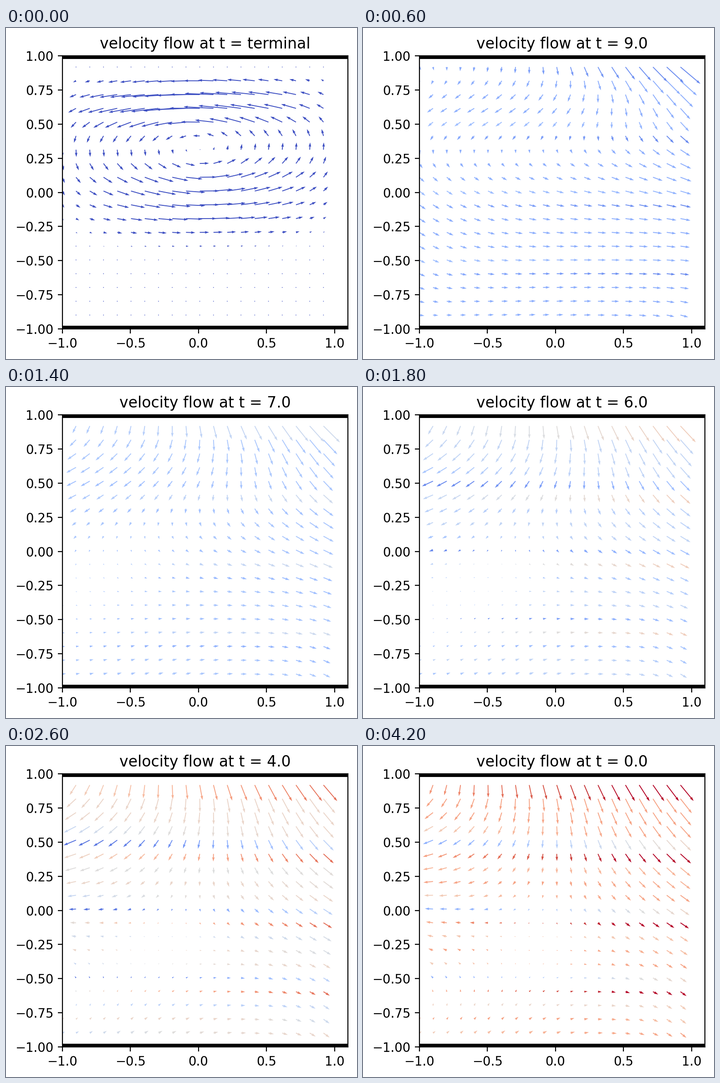
Recreate the animation shown at these times as a matplotlib script. Size 771 by 726 pixels, loop 4.4 s.

```python
import numpy as np
import matplotlib.pyplot as plt
from matplotlib.animation import FuncAnimation

W, H, DPI = 771, 726, 200
LEFT, TOP, BOTTOM, AX_W = 123.6, 61.4, 659.8, 627.8   # axes box in pixels
STEP_MS, FRAMES = 200, 22
N = 20

grid = -1 + np.arange(N) * 10 / 99
x, y = np.meshgrid(grid, grid)
band, place = np.divmod(np.arange(N * N), 100)
strip = place / 99


def bell(z, centre, width, power=2):
    return np.exp(-np.abs((z - centre) / width) ** power)


def sigmoid(z):
    return 1 / (1 + np.exp(-z))


# All fields give arrow components in pixels, v pointing up.
def vortex():
    """A flat vortex under the lid, calm near both walls."""
    lid = np.clip((0.93 - y) / 0.12, 0, 1)
    along = 43 * bell(y, -0.04, 0.28, 3) - 70 * bell(y, 0.66, 0.2) * lid
    narrow = np.cos(1.4 * x) ** (1 + 1.6 * (y - 0.31) ** 2)
    across = 16 * bell(y, 0.31, 0.42) * lid
    return along * narrow, across * np.tanh(3.5 * x)


def spreading():
    """Flow at t = 0: falls from the top and fans out sideways."""
    u = 5.5 * (y - 0.4) ** 2 + 9 * np.exp(8 * (y - 0.92)) + 25 * bell(y, 0.45, 1) * x
    down = 5.3 + 20 * y + 11 * y**2 + 8 * x + (1 - 8 * y) * x**2
    return np.array([u, -down])


def turning():
    """Flow at t = 9: runs right below, turns back above, jets in the corner."""
    upper = sigmoid(5 * (y - 0.4))
    u = (17.5 - 4 * y**2 - 27.5 * bell(y, 0.59, 0.34)
         + 3 * x + upper * (21 * x + 25 * x**2))
    down = (4.4 + 10.5 * y + 5 * y**2
            + (12.5 * (y + 0.3) ** 2 - 2.5) * x + 4.5 * x**2)
    return np.array([u, -down])


def sweep():
    """Push to the upper left that swells and fades between the two."""
    push = (1 - x) * sigmoid(6 * (y - 0.2))
    return np.array([-4 * push, -1.5 * push])


START, LATE, SWEEP = spreading(), turning(), sweep()


def flow(t):
    blend = (t / 9) ** 2.7
    return START + (LATE - START) * blend + SWEEP * np.sin(np.pi * t / 9)


def shade(t):
    """Colour runs along a strip that wraps over every five rows of arrows."""
    middle = 0.23 + 0.25 * (1 + np.cos(np.pi * t / 10))
    left = 0.54 * sigmoid(2 * (6.2 - t)) - 0.06
    right = 0.35 - 0.45 * (t / 9) ** 2.5
    dip = 0.06 * np.clip((9 - t) / 5, 0, 1) * (3 - band) * bell(strip, 0.7, 0.13, 4)
    return np.clip(middle - left * bell(strip, 0, 0.19)
                   + right * np.clip((strip - 0.8) / 0.2, 0, 1) - dip, 0, 1)


plt.rcParams["font.size"] = 9.93
fig = plt.figure(figsize=(W / DPI, H / DPI), dpi=DPI, facecolor="white")
ax = fig.add_axes([LEFT / W, 1 - BOTTOM / H, AX_W / W, (BOTTOM - TOP) / H])
ax.set_xlim(-1, 1.1)
ax.set_ylim(-1, 1)
ax.set_xticks(np.linspace(-1, 1, 5))
ax.set_yticks(np.linspace(-1, 1, 9))
for wall in (-1, 1):
    ax.axhline(wall, color="black", lw=5)

arrows = ax.quiver(grid, grid, *vortex(), np.zeros(N * N), cmap="coolwarm", clim=(0, 1),
                   scale=AX_W, scale_units="width", width=0.003)
title = ax.set_title("")


def update(i):
    if i == 0:
        arrows.set_UVC(*vortex(), np.full(N * N, 0.005))
        title.set_text("velocity flow at t = terminal")
    else:
        t = (FRAMES - 1 - i) / 2
        arrows.set_UVC(*flow(t), shade(t))
        title.set_text(f"velocity flow at t = {t:.1f}")
    return arrows, title


anim = FuncAnimation(fig, update, frames=FRAMES, interval=STEP_MS, repeat=True)
plt.show()
```
